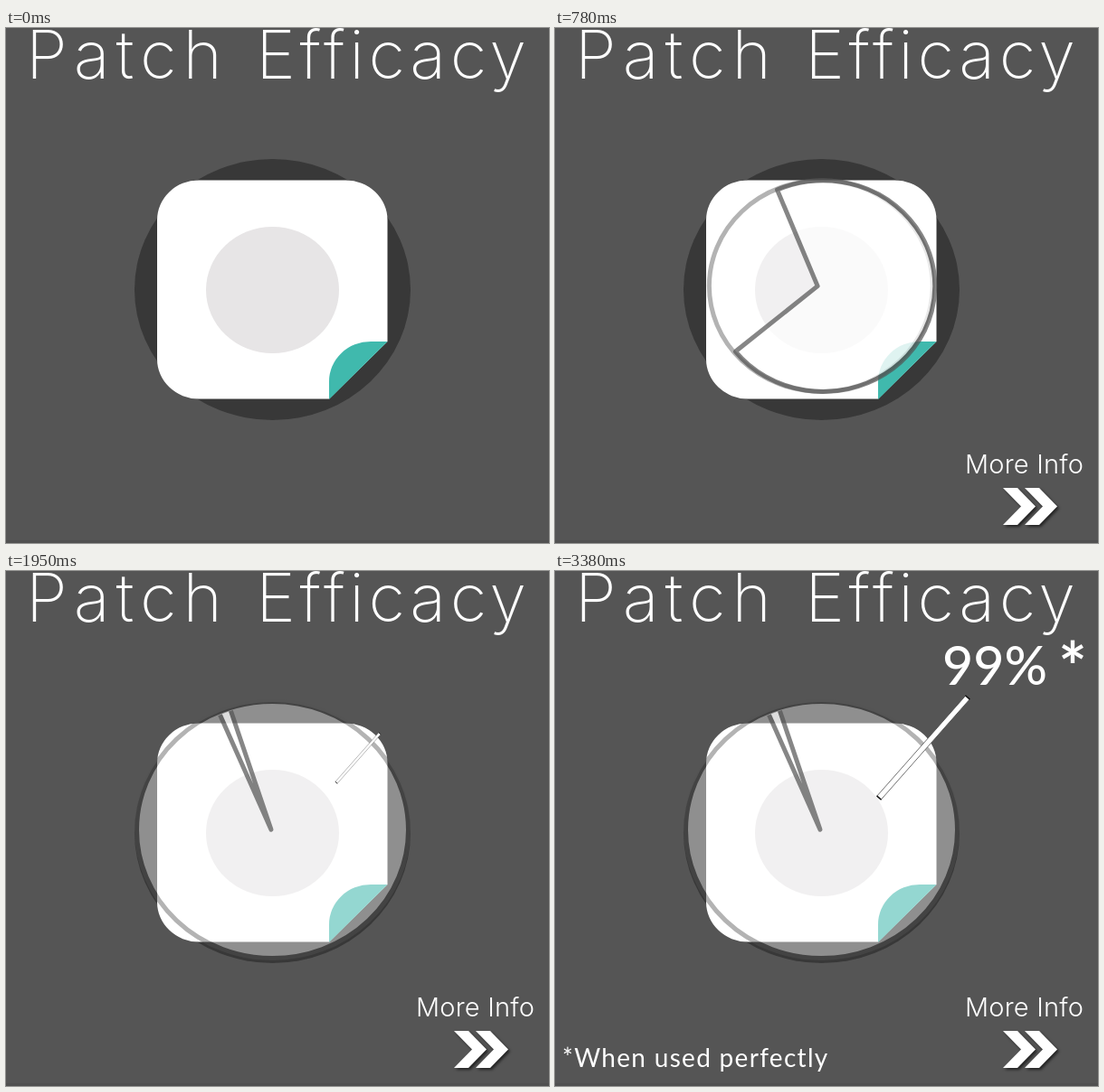
An HTML page for the animation above (7.02 s loop, 600x570 px).

```html
<!DOCTYPE html>
<html lang="en">
<head>
<meta charset="utf-8">
<title>Patch Efficacy</title>
<style>
  html, body { margin: 0; width: 100%; height: 100%; overflow: hidden; background: #555; }
  svg { display: block; width: 600px; height: 570px; }
  text { font-family: Lato, "Open Sans", sans-serif; fill: #fff; }
  .wide { font-family: Inter, "Open Sans", sans-serif; }
  .title { font-size: 74px; font-weight: 250; text-anchor: middle; }
  .pie { stroke: #535353; stroke-width: 5; stroke-linejoin: round; }
</style>
</head>
<body>
<svg viewBox="0 0 600 570">
  <rect width="600" height="570" fill="#555"/>
  <rect y="567" width="600" height="3" fill="#505050"/>
  <text class="wide title" x="134" y="56" letter-spacing="7">Patch</text>
  <text class="wide title" x="428" y="56" letter-spacing="4.6">Efficacy</text>

  <ellipse cx="294.5" cy="289.5" rx="152.5" ry="144.5" fill="#383838"/>
  <path fill="#fff" d="M213 168.5H375A46 44 0 0 1 421.5 212.5V347L357 410.5H213A46 44 0 0 1 167 366.5V212.5A46 44 0 0 1 213 168.5Z"/>
  <ellipse cx="294.5" cy="290" rx="73.5" ry="70" fill="#e7e5e6"/>
  <path fill="#40b9ad" d="M421.5 347H403A46 44 0 0 0 357 391V411Z"/>

  <ellipse id="disc" class="pie" fill="#fff" opacity=".44"/>
  <g id="slice" opacity=".7">
    <path id="fill" fill="#fff"/>
    <path id="edge" class="pie" fill="none"/>
  </g>

  <g id="rod">
    <path fill="#fff" stroke="#444" stroke-width=".7" d="M-74-3H74V3H-74Z"/>
    <path stroke="#111" stroke-width="1.5" d="M-74-3.3V3.3M74-3.3V3.3"/>
  </g>

  <text id="percent" x="486" y="126" font-size="59" font-weight="500" text-anchor="middle">99%</text>
  <text id="star" x="572" y="133" font-size="74" font-weight="700" text-anchor="middle">*</text>
  <text id="note" x="8" y="549" font-size="28" letter-spacing="1.3">*When used perfectly</text>

  <g id="more"><text class="wide" x="-2" font-size="29" font-weight="300" letter-spacing=".2">More Info</text></g>
  <g id="arrows">
    <path d="M-30-20.5h16L6 0-14 20.5h-16L-10 0ZM-6-20.5h16L30 0 10 20.5H-6L14 0Z"
      fill="#fff" style="filter: drop-shadow(2px 2px 1.5px rgba(0,0,0,.6))"/>
  </g>
</svg>
<script>
  const LOOP = 7020, STEP = 130, START = -114.3;
  const POP = [0, .25, .5, .75, .95, 1.05, 1];
  const GROW = [0, 0, 0, .06, .31, .57, .823, 1];
  const SWEEP = [358, 358, 358, 350, 328, 293, 256, 207, 159, 110.5, 75, 48, 26, 5];
  const ROD = [.49, .75, 1];

  const el = id => document.getElementById(id);
  const at = (list, i) => list[Math.min(i, list.length - 1)];
  const show = (id, on) => { el(id).style.display = on ? '' : 'none'; };
  const set = (id, attrs) => {
    for (const key in attrs) el(id).setAttribute(key, attrs[key]);
  };

  function drawPie(step) {
    const size = at(GROW, step), sweep = at(SWEEP, step), full = size === 1;
    show('disc', size);
    show('slice', size);
    const cx = 290.7 + 3.8 * size, cy = 281.5 + 5 * size;
    const rx = 150 * size, ry = 142 * size;
    set('disc', { cx, cy, rx, ry });

    // The tip drifts right as the slice closes; the rim sits right of the disc.
    const tipX = 293 - 4 * sweep / 358, rimX = cx + 2.5;
    const y = full ? 286 + Math.min(3, sweep / 40) : cy;
    const reach = full ? .98 : 1, w = rx * reach, h = ry * reach;
    const point = deg => {
      const a = deg * Math.PI / 180;
      return `${rimX + w * Math.cos(a)} ${y + h * Math.sin(a)}`;
    };
    const from = point(START), to = point(START + sweep);
    const sector = `M${tipX} ${y}L${from}A${w} ${h} 0 ${sweep > 180 ? 1 : 0} 1 ${to}Z`;
    set('fill', { d: sector });
    // The full-size slice has no outline along its rim.
    set('edge', { d: full ? `M${from}L${tipX} ${y}L${to}` : sector });
  }

  function drawRod(step) {
    show('rod', step >= 15);
    if (step < 15) return;
    const size = at(ROD, step - 15), k = (size - .49) / .51;
    const x = 389 + 18 * k, y = 207 - 11.5 * k;
    set('rod', { transform: `translate(${x} ${y}) rotate(-48.6) scale(${size})` });
  }

  function draw() {
    const step = Math.floor(performance.now() % LOOP / STEP);
    const pop = at(POP, step);
    set('more', { transform: `translate(455 493) scale(${pop})` });
    set('arrows', { transform: `translate(525 529.5) scale(${pop})` });
    show('more', pop);
    show('arrows', pop);
    drawPie(step);
    drawRod(step);
    show('percent', step >= 18);
    show('star', step >= 22);
    show('note', step >= 26);
    requestAnimationFrame(draw);
  }
  draw();
</script>
</body>
</html>
```
